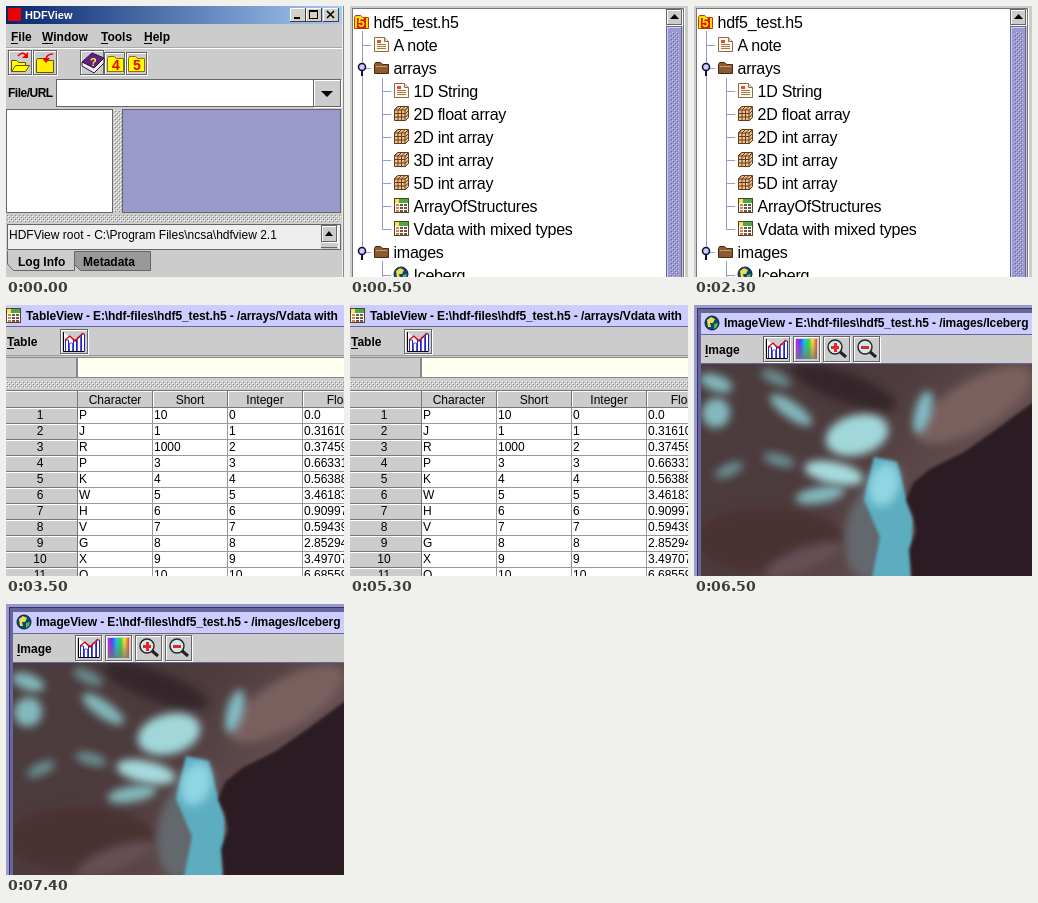
Write an HTML page that moves like this. It is 338 px wide and 271 px high and loops after 8 s.

```html
<!DOCTYPE html>
<html lang="en">
<head>
<meta charset="utf-8">
<title>HDFView tour</title>
<style>
html, body { margin: 0; width: 100%; height: 100%; overflow: hidden; background: #ccc; }
#stage { position: relative; width: 338px; height: 271px; overflow: hidden; }
#strip { animation: cut 8s step-end infinite; }
#strip > svg { display: block; width: 338px; height: 271px; overflow: hidden; }
#defs { position: absolute; width: 0; height: 0; }
text { font: 12px "Liberation Sans", Arial, sans-serif; fill: #000; white-space: pre; }
@keyframes cut {
  0% { transform: translateY(0); }
  6.25% { transform: translateY(-271px); }
  43.75% { transform: translateY(-542px); }
  81.25%, 100% { transform: translateY(-813px); }
}
</style>
</head>
<body>
<svg id="defs">
  <defs>
    <linearGradient id="bar"><stop stop-color="#08246b"/><stop offset="1" stop-color="#a5cbf7"/></linearGradient>
    <linearGradient id="rainbow">
      <stop stop-color="#f0f"/><stop offset=".2" stop-color="#44f"/><stop offset=".4" stop-color="#0cf"/>
      <stop offset=".6" stop-color="#3d3"/><stop offset=".8" stop-color="#fe3"/><stop offset="1" stop-color="#f33"/>
    </linearGradient>
    <linearGradient id="shade" x2="0" y2="1">
      <stop stop-color="#777" stop-opacity="0"/><stop offset="1" stop-color="#777" stop-opacity=".8"/>
    </linearGradient>
    <linearGradient id="land" x1="0" y1="0" x2="1" y2=".5">
      <stop stop-color="#4a3c3f"/><stop offset=".5" stop-color="#4d3b3d"/><stop offset="1" stop-color="#6d5657"/>
    </linearGradient>
    <pattern id="bumps" width="4" height="4" patternUnits="userSpaceOnUse">
      <path d="M0 0h1v1h-1zM2 2h1v1h-1z" fill="#fff"/><path d="M1 1h1v1h-1zM3 3h1v1h-1z" fill="#888"/>
    </pattern>
    <pattern id="thumb" width="4" height="4" patternUnits="userSpaceOnUse">
      <path d="M0 0h1v1h-1zM2 2h1v1h-1z" fill="#ccf"/><path d="M1 1h1v1h-1zM3 3h1v1h-1z" fill="#669"/>
    </pattern>
    <filter id="soft" x="-50%" y="-50%" width="200%" height="200%"><feGaussianBlur stdDeviation="4"/></filter>
    <filter id="edge"><feGaussianBlur stdDeviation="1.5"/></filter>
  </defs>
</svg>
<div id="stage"><div id="strip"></div></div>
<script>
const NS = 'http://www.w3.org/2000/svg';
const strip = document.getElementById('strip');
let scene;

function add(tag, attrs, parent = scene) {
  const node = document.createElementNS(NS, tag);
  for (const k in attrs) node.setAttribute(k, attrs[k]);
  return parent.appendChild(node);
}
function newScene(bg) {
  scene = add('svg', { viewBox: '0 0 338 271' }, strip);
  rect(0, 0, 338, 271, bg);
}
function rect(x, y, width, height, fill) {
  return add('rect', { x, y, width, height, fill, 'shape-rendering': 'crispEdges' });
}
function path(d, fill = 'none', stroke = 'none', width = 1) {
  return add('path', { d, fill, stroke, 'stroke-width': width });
}
function circle(cx, cy, r, fill, stroke = 'none', width = 1) {
  return add('circle', { cx, cy, r, fill, stroke, 'stroke-width': width });
}
function text(x, y, s, style = '') {
  add('text', { x, y, style }).textContent = s;
}
const BOLD = 'font-weight:bold;';
const hline = (x, y, w, c) => rect(x, y, w, 1, c);
const vline = (x, y, h, c) => rect(x, y, 1, h, c);

function frame(x, y, w, h, bg, line = '#666') {
  rect(x, y, w, h, line);
  rect(x + 1, y + 1, w - 2, h - 2, bg);
}
function button(x, y, w, h, bg = '#ccc') {
  frame(x, y, w, h, bg);
  hline(x + 1, y + 1, w - 2, '#fff');
  vline(x + 1, y + 1, h - 2, '#fff');
  hline(x + 1, y + h, w, '#fff');
  vline(x + w, y + 1, h, '#fff');
}
function menu(x, y, s, markWidth) {
  text(x, y, s, BOLD);
  hline(x, y + 2, markWidth, '#000');
}

// Icons
function folder(x, y, w, h, fill, line) {
  path(`M${x + .5} ${y + 2.5}l1-2h${w * .35}l2 2h${w * .65 - 4}v${h - 3}h${1 - w}z`, fill, line);
}
function digitFolder(x, y, digit) {
  folder(x, y, 17, 16, '#ff0', '#960');
  text(x + 5, y + 14, digit, BOLD + 'font-size:14px;fill:#e00');
}
function note(x, y) {
  path(`M${x + .5} ${y + .5}h10l4 4v10h-14z`, '#fffbe8', '#8b6b4b');
  path(`M${x + 10.5} ${y + .5}v4h4`, '#ddd', '#8b6b4b');
  rect(x + 3, y + 3, 4, 3, '#e44');
  for (let i = 0; i < 3; i++) hline(x + 3, y + 7 + i * 2, 9, '#a75');
}
function gridIcon(x, y) {
  path(`M${x + 3.5} ${y + .5}h11v11l-3 3h-11v-11z`, '#e8c49a', '#6b3a10');
  for (let i = 0; i < 4; i++) {
    path(`M${x + 3.5 * i + .5} ${y + 14}v-10l3-3M${x + .5} ${y + 14.5 - 3.5 * i}h11l3-3`, 'none', '#6b3a10');
  }
}
function tableIcon(x, y) {
  frame(x, y, 15, 15, '#fff', '#5a4020');
  rect(x + 1, y + 1, 13, 4, '#4a4');
  rect(x + 1, y + 1, 4, 4, '#fd6');
  for (let i = 0; i < 3; i++) for (let j = 0; j < 3; j++) {
    rect(x + 2 + i * 4, y + 6 + j * 3, 3, 2, i ? '#754' : '#c84');
  }
}
function globe(x, y) {
  circle(x, y, 7, '#147', '#024');
  path(`M${x - 5} ${y - 3}l4-3 4 2-2 4-3 0 1 4-3 0z`, '#ed4');
  path(`M${x + 2} ${y + 1}l4-1-1 4-3 2z`, '#5b4');
}
function chart(x, y, bars) {
  path(`M${x + .5} ${y}v19.5h21`, '#fff', '#000');
  [11, 8, 11, 14, 17].forEach((h, i) => {
    path(`M${x + 2.5 + i * 4} ${y + 19}v${-h}h3v${h}`, '#fff', bars[i % bars.length]);
  });
  path(`M${x + 2} ${y + 8}l5-4 5 5 8-8`, 'none', '#d00', 1.3);
}
function lens(x, y, sign) {
  path(`M${x + 4} ${y + 4}l7 6`, 'none', '#222', 3);
  circle(x, y, 7, '#cfeaea', '#222', 1.4);
  rect(x - 4, y - 1, 8, 3, '#e22');
  if (sign > 0) rect(x - 1, y - 4, 3, 9, '#e22');
}

function mainWindow() {
  newScene('#ccc');
  rect(0, 0, 336, 18, 'url(#bar)');
  rect(2, 2, 13, 13, '#e00');
  text(19, 13, 'HDFView', BOLD + 'font-size:11px;fill:#fff');
  for (const x of [284, 300, 317]) {
    frame(x, 2, 16, 14, '#d4d0c8', '#404040');
    hline(x, 2, 15, '#fff');
    vline(x, 2, 13, '#fff');
  }
  rect(288, 11, 6, 2, '#000');
  frame(303, 4, 9, 9, '#d4d0c8', '#000');
  hline(303, 5, 9, '#000');
  path('M321 5l7 7M328 5l-7 7', 'none', '#000', 1.6);

  menu(5, 35, 'File', 7);
  menu(36, 35, 'Window', 11);
  menu(95, 35, 'Tools', 7);
  menu(138, 35, 'Help', 8);
  hline(0, 41, 336, '#aaa');
  hline(0, 42, 336, '#fff');

  for (const x of [2, 27, 74]) button(x, 44, 24, 25);
  for (const x of [98, 120]) button(x, 46, 21, 23);
  path('M5.5 65.500v-11h5l2 2h7v3h4l-4 6z', '#ff0', '#650');
  path('M5.5 65.500l4-6h14', 'none', '#650');
  path('M12 50q4-5 8-1', 'none', '#e00', 1.6);
  path('M22 46v6h-6z', '#e00');
  folder(30, 52, 18, 15, '#fe0', '#650');
  path('M40 54q0-6 7-6', 'none', '#e00', 1.6);
  path('M36 52h8l-4 5z', '#e00');
  path('M76 56l10-9 12 5-10 10z', '#62217f', '#301040');
  path('M76 56v4l12 7 10-10v-5l-10 10z', '#eee', '#301040');
  text(84, 60, '?', BOLD + 'font-size:11px;fill:#ff3');
  digitFolder(101, 50, '4');
  digitFolder(122, 50, '5');

  text(2, 91, 'File/URL', BOLD + 'letter-spacing:-.5px');
  frame(50, 73, 258, 28, '#fff');
  button(307, 73, 28, 28);
  path('M315 85h12l-6 6z', '#000');

  frame(0, 103, 107, 104, '#fff');
  rect(108, 104, 8, 102, 'url(#bumps)');
  frame(116, 103, 219, 104, '#99c');
  rect(1, 209, 334, 7, 'url(#bumps)');

  frame(1, 218, 334, 26, '#eee');
  text(3, 233, 'HDFView root - C:\\Program Files\\ncsa\\hdfview 2.1');
  rect(315, 219, 17, 24, '#ccc');
  button(315, 219, 16, 17);
  path('M319 230h8l-4-5z', '#000');
  hline(315, 241, 16, '#666');

  path('M68.5 245.5h76v19h-70l-6-6z', '#999', '#666');
  path('M1.5 245v13l6 6.500h61v-19', '#ccc', '#666');
  hline(2, 245, 66, '#ccc');
  text(12, 260, 'Log Info', BOLD);
  text(77, 260, 'Metadata', BOLD);
  vline(336, 0, 271, '#eee');
  vline(337, 0, 271, '#888');
}

function treeView() {
  newScene('#fff');
  rect(0, 0, 338, 2, '#ccc');
  rect(0, 0, 2, 271, '#ccc');
  hline(2, 2, 331, '#777');
  vline(2, 2, 269, '#777');

  const LINE = '#99c';
  const rows = [
    [0, 'hdf5_test.h5'], [1, 'A note', note], [1, 'arrays'], [2, '1D String', note],
    [2, '2D float array', gridIcon], [2, '2D int array', gridIcon], [2, '3D int array', gridIcon],
    [2, '5D int array', gridIcon], [2, 'ArrayOfStructures', tableIcon],
    [2, 'Vdata with mixed types', tableIcon], [1, 'images'],
    [2, 'Iceberg', (x, y) => globe(x + 7, y + 7)]
  ];
  vline(12, 25, 221, LINE);
  vline(32, 72, 152, LINE);
  vline(32, 255, 16, LINE);
  rows.forEach(([level, label, icon], i) => {
    const y = 16 + 23 * i, x = 4 + 20 * level;
    if (level) hline(x - 12, y, 9, LINE);
    if (icon) icon(x, y - 8);
    else if (level) {
      folder(x, y - 6, 15, 12, '#8b5a30', '#4a2808');
      hline(x + 2, y - 2, 11, '#c89a6a');
      circle(12, y - 1, 3.5, '#ccf', '#113', 1.6);
      rect(11, y + 3, 2, 5, '#113');
    } else {
      folder(x, y - 7, 15, 14, '#fd0', '#a40');
      rect(x + 3, y - 4, 9, 10, '#e10');
      text(x + 4, y + 5, '5', BOLD + 'font-size:12px;fill:#ff0');
    }
    text(x + 19.5, y + 6, label, 'font-size:16px;letter-spacing:-.25px');
  });

  rect(316, 3, 17, 268, '#ccc');
  button(316, 3, 16, 16);
  path('M320 13h9l-4.500-5z', '#000');
  frame(316, 20, 16, 252, '#99c', '#669');
  hline(317, 21, 14, '#ccf');
  vline(317, 21, 250, '#ccf');
  rect(320, 26, 9, 245, 'url(#thumb)');
  rect(333, 2, 5, 269, '#ccc');
  vline(333, 2, 269, '#777');
  vline(334, 2, 269, '#fff');
}

function tableView() {
  newScene('#ccc');
  rect(0, 0, 338, 21, '#ccf');
  hline(0, 21, 338, '#669');
  tableIcon(0, 3);
  text(20, 15, 'TableView - E:\\hdf-files\\hdf5_test.h5 - /arrays/Vdata with', BOLD + 'letter-spacing:-.1px');
  menu(1, 41, 'Table', 7);
  button(54, 24, 28, 25);
  chart(57, 27, ['#22c', '#55d']);
  hline(0, 50, 338, '#999');
  frame(-1, 52, 72, 21, '#ccc', '#888');
  frame(71, 52, 268, 21, '#fffff0', '#888');
  rect(0, 76, 338, 7, 'url(#bumps)');

  const top = 103;
  const edges = [72, 147, 222, 297];
  hline(0, 85, 338, '#777');
  hline(0, 86, 338, '#fff');
  rect(72, top, 266, 168, '#fff');
  ['Character', 'Short', 'Integer', 'Float'].forEach((s, i) => {
    text(edges[i] + 37, 99, s, 'text-anchor:middle');
  });
  hline(0, top - 1, 338, '#777');

  const letters = 'PJRPKWHVGXO';
  const floats = ['0.0', '0.31610', '0.37459', '0.66331', '0.56388', '3.46183',
    '0.90997', '0.59439', '2.85294', '3.49707', '6.68559'];
  floats.forEach((f, i) => {
    const y = top + 16 * i;
    hline(0, y, 71, '#fff');
    hline(0, y + 15, 71, '#777');
    hline(72, y + 15, 266, '#999');
    text(34, y + 11, i + 1, 'text-anchor:middle');
    const short = i === 0 ? 10 : i === 2 ? 1000 : i;
    [letters[i], short, i, f].forEach((s, k) => text(edges[k] + 1, y + 11, s));
  });
  vline(71, 86, 185, '#777');
  for (const x of edges.slice(1)) {
    vline(x - 1, 86, 17, '#777');
    vline(x, 86, 16, '#fff');
    vline(x - 1, top, 168, '#999');
  }
}

function imageView() {
  newScene('#99c');
  rect(3, 3, 335, 268, '#669');
  hline(3, 3, 335, '#336');
  vline(3, 3, 268, '#336');
  rect(7, 8, 331, 22, '#ccf');
  globe(18, 18);
  text(30, 22, 'ImageView - E:\\hdf-files\\hdf5_test.h5 - /images/Iceberg', BOLD + 'letter-spacing:-.1px');
  rect(7, 30, 331, 28, '#ccc');
  hline(7, 29, 331, '#669');
  menu(11, 49, 'Image', 3);
  for (const x of [69, 99, 129, 159]) button(x, 31, 27, 26);
  chart(72, 34, ['#22c', '#55d']);
  for (const fill of ['url(#rainbow)', 'url(#shade)']) rect(102, 34, 21, 20, fill);
  lens(141, 42, 1);
  lens(171, 42, -1);

  // Satellite view in soft tones
  scene = add('svg', { x: 7, y: 59, width: 331, height: 212, viewBox: '7 59 331 212' });
  rect(7, 59, 331, 212, 'url(#land)');
  const blob = (cx, cy, rx, ry, fill, turn = 0) => add('ellipse', {
    cx, cy, rx, ry, fill, filter: 'url(#soft)', transform: `rotate(${turn} ${cx} ${cy})`
  });
  const blur = (d, fill) => path(d, fill).setAttribute('filter', 'url(#edge)');
  const ice = '#83b9bd', faint = '#6b9194';
  blob(75, 235, 75, 32, '#4b3033');
  blob(150, 82, 55, 15, '#35282b', 20);
  blob(280, 100, 65, 24, '#79605f', -30);
  blob(110, 255, 42, 12, '#655054', -20);
  blob(180, 225, 28, 50, '#63686d', 12);
  blob(22, 78, 17, 8, ice, 20);
  blob(22, 108, 14, 15, ice, 15);
  blob(82, 73, 16, 6, faint, 25);
  blob(97, 105, 25, 8, ice, 35);
  blob(35, 165, 15, 6, faint, -25);
  blob(85, 155, 16, 6, faint, 15);
  blob(229, 107, 8, 22, '#82bec6', 15);
  blob(163, 130, 32, 20, '#a1d7d9', -15);
  blob(140, 168, 30, 11, '#a5dadd', 12);
  blob(126, 190, 25, 8, ice, -10);
  blur('M180 152L203 157 210 185 219 215 217 273H178L186 232 170 195z', '#5cadc0');
  blob(190, 180, 15, 22, '#8fd5e2', 15);
  blur('M342 95L300 126 270 147 236 164 219 178 212 195 219 210 222 226 215 245 218 275H342z', '#2b1d23');
}

mainWindow();
treeView();
tableView();
imageView();
</script>
</body>
</html>
```
